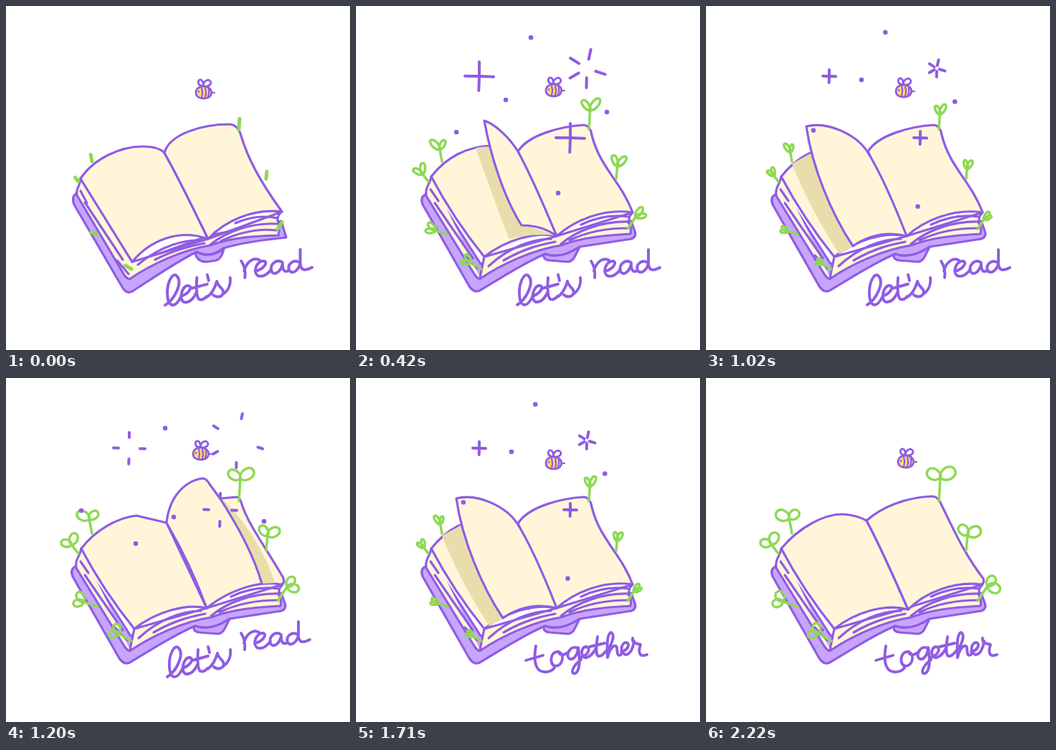
An HTML page with a canvas for the animation above (2250 ms loop, 480x480 px).

```html
<!DOCTYPE html>
<html lang="en">
<head>
<meta charset="utf-8">
<title>Let's read together</title>
<style>
html, body { margin: 0; height: 100%; overflow: hidden; background: #fff; }
canvas { display: block; }
</style>
</head>
<body>
<canvas id="stage" width="480" height="480"></canvas>
<script>
const ctx = document.getElementById('stage').getContext('2d');
const PURPLE = '#8f5ce3', LILAC = '#c7a5ff', CREAM = '#fff6da';
const SHADE = '#e9deab', GREEN = '#8fd855', YELLOW = '#ffd872';
const STEP = 150, POSES = 5, LOOP = 2250;

ctx.lineCap = ctx.lineJoin = 'round';

function draw(path, fill, stroke = PURPLE, width = 3.2) {
  const shape = new Path2D(path);
  if (fill) { ctx.fillStyle = fill; ctx.fill(shape); }
  if (stroke) { ctx.strokeStyle = stroke; ctx.lineWidth = width; ctx.stroke(shape); }
}

// The book at rest, and the book while a page is turning.
const restBook = {
  cover: 'M98 262Q91 266 95 277L162 392Q169 404 178 397C212 375 238 357 266 343Q284 353 303 338C330 330 360 326 391 323L384 300L284 320L174 360L104 250Z',
  spine: 'M264 345Q267 357 280 357L293 355Q301 353 304 339Q284 353 266 343Z',
  block: 'M104 240C104 252 97 253 99 264L166 377Q172 383 174 380C202 361 246 340 285 334C318 322 350 321 380 320Q383 308 379 299Q379 291 385 287L282 325L176 357Z',
  lines: 'M104 258L113 275M110 274L163 354M155 355L171 374M184 361C215 335 250 325 275 327M208 354C235 340 258 335 277 331M285 333C310 313 345 302 379 304M320 303C345 292 365 293 379 296M300 328C325 316 350 310 377 313'
};
const openBook = {
  cover: 'M97 263Q89 267 93 277L158 391Q166 403 176 395C208 376 235 358 264 346Q285 354 312 336L384 325Q392 322 389 314L384 300L284 320L174 360L104 250Z',
  spine: 'M262 347Q261 354 270 355L296 357Q302 356 305 350L312 336Q285 354 264 346Z',
  block: 'M105 238C103 250 96 252 98 265L165 374Q171 383 174 380C202 361 246 340 286 334C318 322 350 320 383 318Q385 308 380 302L382 293L386 288L280 321L179 350L173 379',
  lines: 'M104 256L115 272M110 275L163 352M152 348L169 366M185 363C213 337 245 325 272 325M206 355C235 338 258 333 278 329M286 332C310 312 345 300 381 301M314 305C335 295 358 291 380 294M298 327C320 316 350 310 380 310'
};
const openBottom = 'C345 282 305 299 280 321';
const openLeft = 'C250 314 208 327 179 350Q136 297 105 238';
const openRight = 'M226 203C240 180 285 168 318 166Q327 167 329 180C340 225 370 245 386 288' + openBottom + 'Z';

const poses = [
  {
    book: restBook, bee: [276, 121], grow: 0.45, leaf: 0, fold: 0,
    left: 'M104 241C122 213 160 196 190 196Q213 196 221 205C240 238 265 290 282 325C240 310 200 328 176 357Z',
    right: 'M221 205C228 178 275 165 312 165Q323 166 327 178C338 215 355 245 385 287C345 282 305 300 282 325C265 290 240 238 221 205Z'
  },
  {
    book: openBook, bee: [276, 119], grow: 0.62, leaf: 0.35, fold: 0.45,
    left: 'M105 238C125 212 155 195 190 195Q212 196 225 203L280 321' + openLeft,
    right: openRight,
    shade: 'M120 220C135 260 165 315 186 346L215 330L160 198Z',
    flip: 'M225 203C210 180 170 160 140 168C148 225 175 290 205 335C230 318 255 315 280 321C262 275 242 230 225 203Z'
  },
  {
    book: openBook, bee: [276, 118], grow: 0.8, leaf: 0.62, fold: 0.4,
    left: 'M105 238C125 212 155 195 190 195Q212 196 226 203L280 321' + openLeft,
    right: openRight,
    shade: 'M167 198Q178 196 190 196L231 304L279 320Q245 317 214 325C203 300 182 240 167 198Z',
    flip: 'M179 160C195 165 215 185 226 203C245 238 263 280 280 321C264 309 247 306 231 306C205 265 187 205 179 160Z'
  },
  {
    book: openBook, bee: [272, 106], grow: 0.95, leaf: 0.9, fold: 0.1,
    left: 'M105 238C125 212 155 195 182 192L224 202C245 238 265 280 280 321' + openLeft,
    right: 'M224 202L300 168L322 166Q327 167 329 176C338 205 365 240 387 279Q389 287 384 288' + openBottom + 'Z',
    shade: 'M302 169C335 200 365 250 375 286L356 287Z',
    flip: 'M224 202C228 165 250 143 275 140Q280 141 284 148L300 170C322 205 345 245 357 287C325 292 300 305 280 321C265 280 245 238 224 202Z'
  },
  {
    book: openBook, bee: [279, 117], grow: 1, leaf: 1, fold: 0,
    left: 'M105 238C130 208 165 190 190 190Q210 191 224 199C245 238 263 280 282 323' + openLeft,
    right: 'M224 199C245 180 280 166 316 165Q325 166 329 178C345 210 360 245 387 280Q389 286 384 288C345 283 305 300 282 323C263 280 245 238 224 199Z'
  }
];

function drawBook({ book, left, right, shade, flip }) {
  draw(book.cover, LILAC);
  draw(book.spine, LILAC);
  draw(book.block, CREAM);
  draw(book.lines);
  draw(left, CREAM);
  draw(right, CREAM);
  if (shade) draw(shade, SHADE, null);
  if (flip) draw(flip, CREAM);
}

// Sprouts: base, full-grown tip, and the two leaf vectors from the tip.
const sprouts = [
  [325, 172, 327, 139, -18, -9, 20, -11],
  [120, 217, 116, 196, -18, -8, 13, -10],
  [101, 245, 91, 232, -15, -3, 7, -16],
  [128, 319, 107, 312, -14, 4, -7, -14],
  [175, 367, 156, 356, -14, 3, -3, -14],
  [363, 241, 365, 219, -11, -13, 18, -8],
  [379, 311, 393, 290, 9, -13, 17, 6]
];

function drawLeaf(x, y, vx, vy, spread) {
  const nx = -vy * spread, ny = vx * spread;
  const side = s => [x + vx * 0.15 + nx * s, y + vy * 0.15 + ny * s, x + vx + nx * s, y + vy + ny * s];
  const [a, b, c, d] = side(1), [e, f, g, h] = side(-1);
  draw(`M${x} ${y}C${a} ${b} ${c} ${d} ${x + vx} ${y + vy}C${g} ${h} ${e} ${f} ${x} ${y}`, null, GREEN, 3.5);
}

function drawSprout([bx, by, tx, ty, ...leaves], { grow, leaf, fold }) {
  const x = bx + (tx - bx) * grow, y = by + (ty - by) * grow;
  draw(`M${bx} ${by}L${x} ${y}`, null, GREEN, leaf ? 3.5 : 5);
  if (!leaf) return;
  const stem = Math.hypot(tx - bx, ty - by);
  const ux = (tx - bx) / stem, uy = (ty - by) / stem;
  for (let i = 0; i < 4; i += 2) {
    const lift = Math.hypot(leaves[i], leaves[i + 1]) * fold;
    drawLeaf(x, y, leaves[i] * leaf + ux * lift, leaves[i + 1] * leaf + uy * lift, 0.5 - 0.5 * fold);
  }
}

function drawBee([x, y]) {
  ctx.save();
  ctx.translate(x, y);
  draw('M-1 -9C-10 -10 -9 -19 -4 -18Q0 -16 -1 -9C0 -19 9 -20 10 -14Q9 -8 -1 -9', '#fff', PURPLE, 2.8);
  draw('M-11 0C-11 -6 -6 -9 0 -9C7 -9 11 -4 11 0C10 6 5 8 0 8C-7 8 -11 5 -11 0Z', YELLOW, PURPLE, 2.8);
  draw('M-3 -6Q-1 0 -3 6M2 -6Q4 0 2 6M7 -5Q8 0 6 5M12 0L15 0M-7 -2V-1', null, PURPLE, 2.2);
  ctx.restore();
}

// Sparkles: centre and ray angles, then the ray span for poses 1 to 3.
const crossRays = [2, 92, 181, 270];
const sparkles = [
  { x: 172, y: 98, rays: crossRays, span: [[0, 9], [0, 20], [15, 22]] },
  { x: 299, y: 184, rays: crossRays, span: [[0, 9], [0, 20], [16, 23]] },
  { x: 322, y: 87, rays: [-148, -78, 18, 91, 150], span: [[4, 12], [13, 27], [31, 38]] }
];
// Drifting dots: place at pose 2, then at pose 3.
const dots = [
  [244, 44, 222, 70], [209, 131, 181, 231], [140, 176, 105, 185],
  [282, 261, 234, 194], [350, 148, 360, 200]
];

function drawSparkles(pose) {
  if (pose < 1 || pose > 3) return;
  for (const { x, y, rays, span } of sparkles) {
    for (const angle of rays) {
      const a = angle * Math.PI / 180, [r0, r1] = span[pose - 1];
      const at = r => `${x + r * Math.cos(a)} ${y + r * Math.sin(a)}`;
      draw(`M${at(r0)}L${at(r1)}`, null, PURPLE, 4);
    }
  }
  const drift = [-0.28, 0, 1][pose - 1];
  for (const [x, y, x2, y2] of dots) {
    draw(`M${x + (x2 - x) * drift} ${y + (y2 - y) * drift}h.1`, null, PURPLE, 6.5);
  }
}

// Hand lettering, one stroke group per letter.
const letsRead = [
  'M225 417C238 409 249 386 241 377C235 370 227 386 228 403C229 420 238 422 246 406',
  'M246 405C258 401 263 391 256 390C247 390 243 411 251 413C260 414 265 405 268 398',
  'M268 379C267 392 267 405 271 409Q276 411 281 405M260 394L282 388',
  'M282 375L284 383',
  'M281 406C288 402 293 392 295 384C296 392 307 395 303 402C300 407 293 406 290 403M303 402C311 397 314 388 313 379',
  'M328 356C332 362 334 371 333 379M332 370C335 357 345 350 353 355',
  'M347 370C358 368 365 358 359 356C350 355 343 370 350 376C358 380 366 372 369 367',
  'M384 358C375 352 366 362 369 370C373 378 382 370 384 360C384 368 386 373 393 369',
  'M407 358C398 353 390 361 393 369C398 376 407 367 408 358M408 340V360C409 371 416 369 424 365'
];
const together = [
  'M251 374C248 390 249 405 258 409C266 412 274 409 277 404M237 394L261 387',
  'M282 382C271 381 269 400 278 402C288 402 292 387 283 382C284 388 291 387 297 382',
  'M309 377C300 372 292 386 297 391C303 396 310 385 310 376C313 395 312 409 306 412C298 414 302 402 314 393',
  'M314 390C325 386 328 376 321 375C313 375 313 392 322 390C328 388 331 384 335 377',
  'M337 361C335 375 334 385 338 388Q342 389 347 383M326 375L347 370',
  'M347 383C357 375 362 358 356 355C350 356 350 375 351 390C354 376 362 370 364 376C365 384 364 389 370 386',
  'M370 382C380 380 383 370 377 369C369 370 368 384 376 386C383 386 387 376 388 367',
  'M386 363C385 371 391 370 397 372C393 384 396 390 406 386'
];

function drawWords(letters, fresh) {
  ctx.save();
  if (fresh) {
    ctx.translate(322, 380);
    ctx.scale(1.03, 1.01);
    ctx.translate(-322, -380);
  }
  draw(letters.join(''), null, PURPLE, 3.9);
  ctx.restore();
}

function render(now) {
  const step = Math.floor(now % LOOP / STEP), index = step % POSES, pose = poses[index];
  ctx.fillStyle = '#fff';
  ctx.fillRect(0, 0, 480, 480);
  drawBook(pose);
  sprouts.forEach(sprout => drawSprout(sprout, pose));
  drawBee(pose.bee);
  drawSparkles(index);
  drawWords(step < 10 ? letsRead : together, step === 0 || step === 10);
  requestAnimationFrame(render);
}
requestAnimationFrame(render);
</script>
</body>
</html>
```
